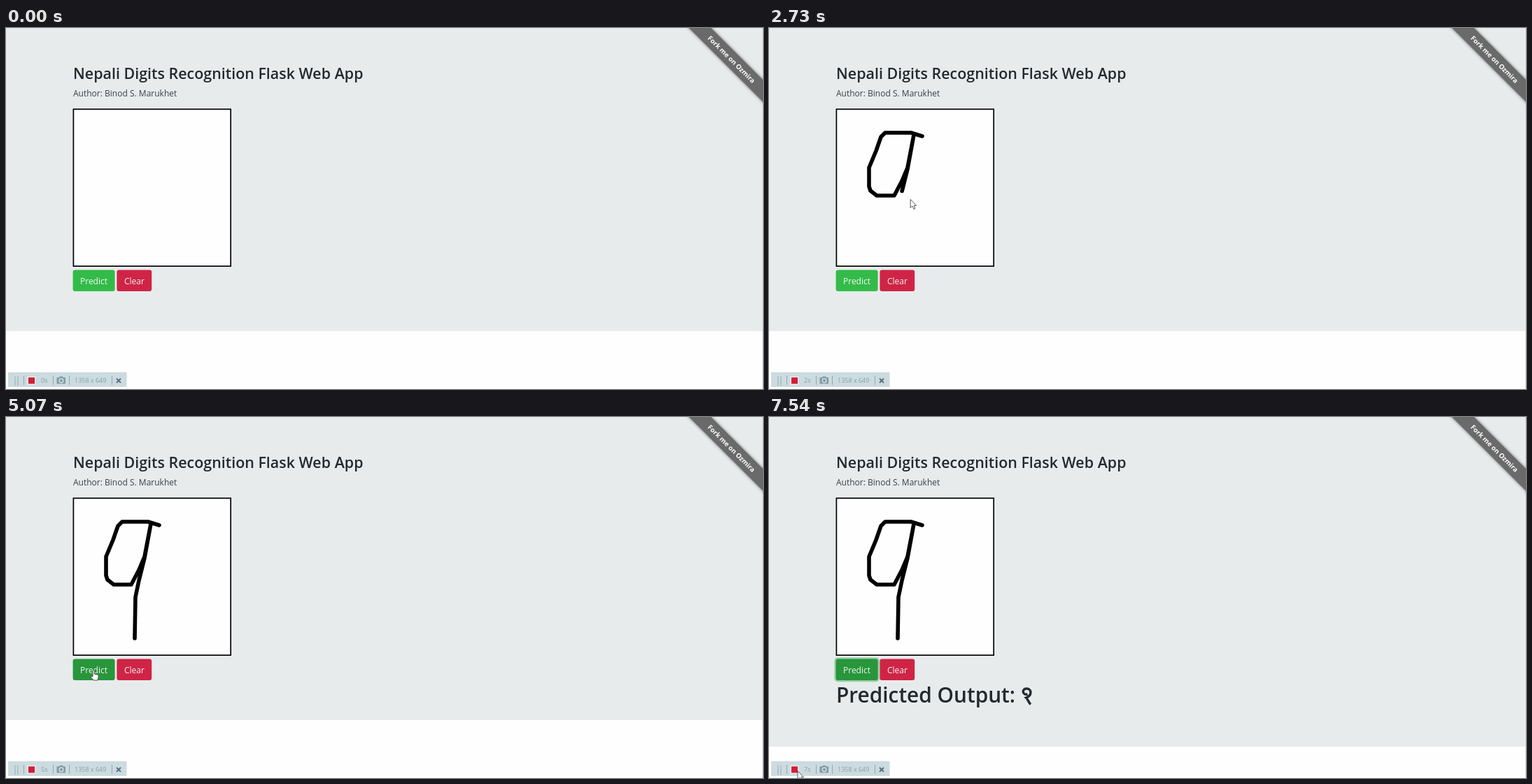
Recreate the animation shown at these times as an HTML page. Size 1082 px wide and 517 px high, loop 7.8 s.

```html
<!DOCTYPE html>
<html lang="en">
<head>
<meta charset="utf-8">
<title>Digit recognition demo</title>
<style>
  html, body { margin: 0; height: 100%; overflow: hidden; background: #fefefe; }
  svg { display: block; width: 1082px; height: 517px; font-family: "Open Sans", "Noto Sans", sans-serif; }
  .heading { font-weight: 600; fill: #24292d; }
  .label { font-size: 12px; fill: #f3f6f3; }
  .small { font-size: 9px; fill: #8ba0a7; }
  .ribbon { filter: drop-shadow(0 0 2px rgba(0, 0, 0, .5)); }
</style>
</head>
<body>
<svg viewBox="0 0 1082 517">
  <rect id="panel" width="1082" height="434" fill="#e7ebec"/>
  <path d="M1081.5 0V517" stroke="#d6dadb"/>
  <text class="heading" x="96" y="73" font-size="21.45">Nepali Digits Recognition Flask Web App</text>
  <text x="96" y="98" font-size="12" fill="#3b4044">Author: Binod S. Marukhet</text>

  <rect x="96.4" y="116.3" width="224.8" height="224.8" fill="#fefefe" stroke="#000" stroke-width="1.7"/>
  <path id="ink" d="M219 155L203 150H166L160 156L153 176L143 200V227L145 233L154 240H179L190 219L198 200L207 153L198 202L190 234L185 258L184 317"
    fill="none" stroke="#000" stroke-width="5.6" stroke-linecap="round" stroke-linejoin="round"/>

  <rect id="focus" x="93.4" y="344.4" width="64.4" height="34.8" rx="5" fill="#96cea4"/>
  <rect id="predict" x="95.6" y="346.6" width="60" height="30.4" rx="3"/>
  <rect x="158.4" y="346.6" width="49.8" height="30.4" rx="3" fill="#cf2445"/>
  <text class="label" x="106" y="366.5">Predict</text>
  <text class="label" x="169" y="366.5">Clear</text>
  <text id="result" class="heading" x="96" y="409" font-size="29.8"></text>
  <path id="digit" d="M369.5 397C362 399 361 389 368 389C376 389 376 399 367.5 402C370 404 371 409 374 411.5" fill="none" stroke="#24292d" stroke-width="3.4"/>

  <g transform="translate(1037 45) rotate(45)">
    <rect class="ribbon" x="-120" y="-11.2" width="240" height="22.4" fill="#6a6a6a"/>
    <text y="3.5" text-anchor="middle" font-size="9.6" font-weight="700" fill="#fff">Fork me on Ozmira</text>
  </g>

  <rect x="3" y="493" width="169.5" height="21" fill="#cbdbdf"/>
  <path d="M13 500V512M17 500V512" stroke="#7f979e" stroke-width="1.6" stroke-linecap="round" stroke-dasharray="0 2.8"/>
  <path d="M25.5 498V511M67.5 498V511M90.5 498V511M151.5 498V511" stroke="#93a8ae"/>
  <rect x="31.2" y="499.7" width="10.6" height="10.6" fill="#cf1f38" stroke="#f1f1f2" stroke-width="1.4"/>
  <text id="clock" class="small" x="50" y="507.5"></text>
  <path d="M72.5 500.5H76L77 499H81L82 500.5H85V509.5H72.5Z" fill="#829ba4"/>
  <circle cx="79" cy="505" r="2.8" fill="#829ba4" stroke="#dbe6e9" stroke-width="1.3"/>
  <text class="small" x="98" y="507.5">1358 x 649</text>
  <path d="M158 502L164 508M164 502L158 508" stroke="#566e77" stroke-width="1.8"/>

  <g id="cursor" fill="#fff" stroke="#444" stroke-width=".9" stroke-linejoin="round">
    <path id="arrow" d="M0 0V12L2.8 9.5L4.8 14L6.8 13.2L5 8.8H8.5Z"/>
    <path id="hand" d="M-1 1Q0 -1 1.2 1V6L6 7Q7.5 7.5 7.2 10L6 15H0L-4 10Q-4 8 -1 10Z"/>
  </g>
</svg>
<script>
const LOOP = 7800, STEP = 130, PEN_OFFSET = 12;
const PEN_DOWN = 985, PEN_UP = 3145, CLICK = 5200, ANSWER = 5590;
const $ = id => document.getElementById(id);
const ink = $("ink"), inkLength = ink.getTotalLength();

const stopButton = { x: 41, y: 507 }, belowButton = { x: 123, y: 391 };
const onButton = { x: 125, y: 362 }, resting = { x: 356, y: 450 };

const progress = (t, start, end) => Math.min(1, Math.max(0, (t - start) / (end - start)));
const inkDrawn = t => inkLength * progress(t, PEN_DOWN, PEN_UP);

function penCursor(t) {
  const { x, y } = ink.getPointAtLength(inkDrawn(t));
  return { x: x + PEN_OFFSET, y: y + PEN_OFFSET };
}

function move(from, to, t, start, end) {
  const k = progress(t, start, end);
  return { x: from.x + (to.x - from.x) * k, y: from.y + (to.y - from.y) * k };
}

function cursorAt(t) {
  if (t < PEN_DOWN) return move(stopButton, penCursor(t), t, STEP, PEN_DOWN);
  if (t < 4030) return penCursor(t);
  if (t < 4550) return move(penCursor(t), belowButton, t, 4030, 4550);
  if (t < 5980) return move(belowButton, onButton, t, 4550, 4810);
  if (t < 6630) return move(onButton, resting, t, 5980, 6500);
  return move(resting, stopButton, t, 6630, 7540);
}

function show(id, visible) {
  $(id).style.display = visible ? "" : "none";
}

function draw(t) {
  const { x, y } = cursorAt(t);
  const hover = x > 96 && x < 155 && y > 347 && y < 377;
  const clicked = t >= CLICK, answered = t >= ANSWER;
  ink.setAttribute("stroke-dasharray", `${inkDrawn(t)} ${inkLength + 9}`);
  $("cursor").setAttribute("transform", `translate(${x} ${y})`);
  show("ink", t > PEN_DOWN);
  show("cursor", t >= STEP);
  show("arrow", !hover);
  show("hand", hover);
  show("focus", clicked);
  show("digit", answered);
  $("predict").setAttribute("fill", hover || clicked ? "#28963b" : "#33bb49");
  $("panel").setAttribute("height", clicked ? 472 : 434);
  $("result").textContent = answered ? "Predicted Output:" : clicked ? "Predicting..." : "";
  $("clock").textContent = Math.floor(t / 1000) + "s";
}

function tick() {
  const t = performance.now() % LOOP;
  draw(Math.floor(t / STEP) * STEP);
  requestAnimationFrame(tick);
}
tick();
</script>
</body>
</html>
```
